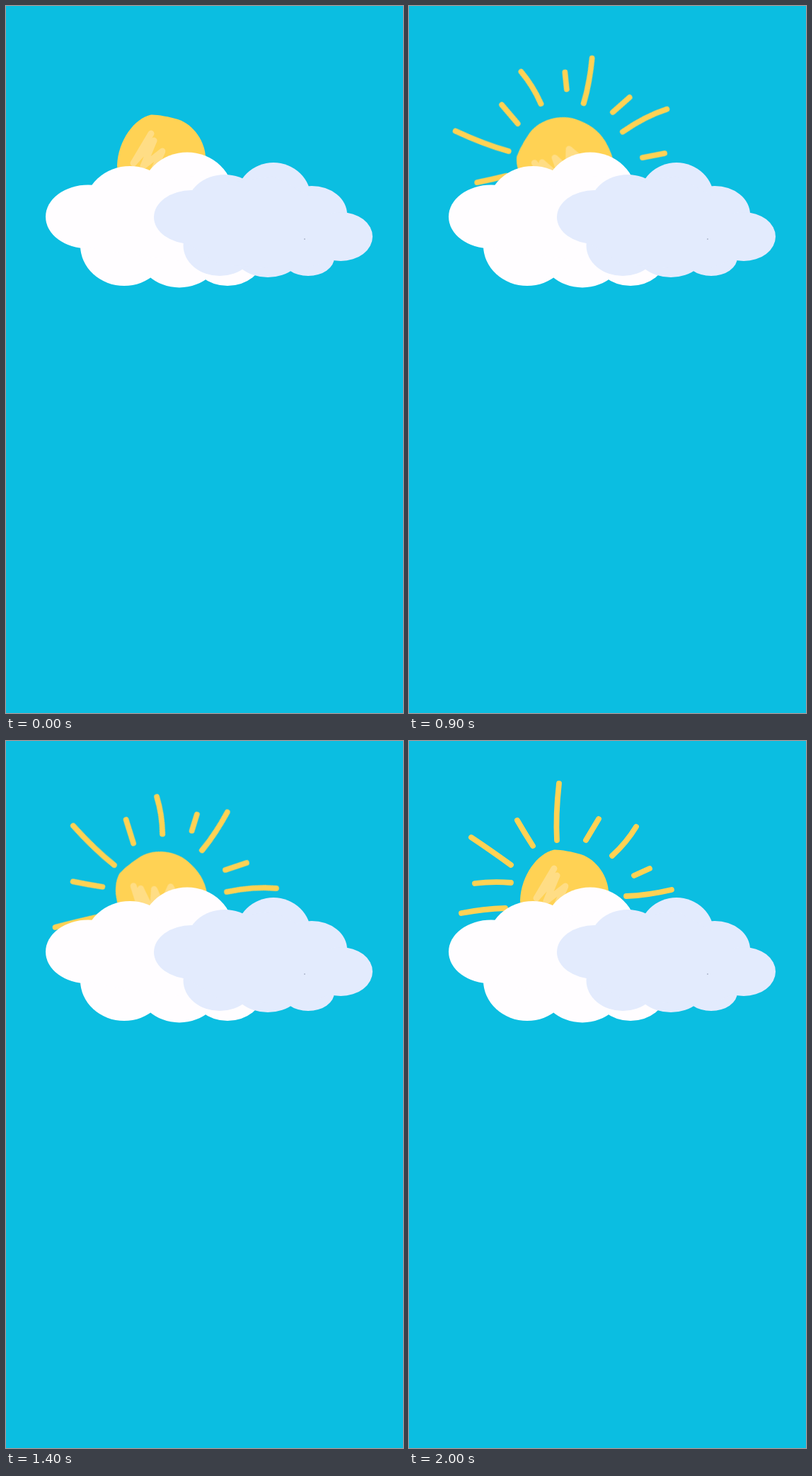
Recreate the animation shown at these times as an HTML page. Size 561 by 998 pixels, loop 2100 ms.

```html
<!DOCTYPE html>
<html lang="en">
<head>
<meta charset="utf-8">
<title>Sun behind clouds</title>
<style>
  html, body { margin: 0; width: 100%; height: 100%; overflow: hidden; background: #0bbee1; }
  svg { display: block; width: 100vw; height: 100vh; }

  .sun, .rays { animation: 2100ms -2ms infinite; }
  .sun { animation-name: swing; }
  .rays {
    animation-name: grow;
    fill: none; stroke: #ffd254; stroke-width: 7.8; stroke-linecap: round;
    stroke-dasharray: 1 2;
  }
  .shine { fill: none; stroke: #ffdd85; stroke-width: 9; stroke-linecap: round; stroke-linejoin: round; }
  .white { fill: #fffdff; }
  .pale { fill: #e3ebfd; }

  /* The picture changes ten times a second, so each stretch is stepped. */
  @keyframes swing {
    0%        { transform: rotate(0deg);     animation-timing-function: steps(4); }
    19.0476%  { transform: rotate(0deg);     animation-timing-function: steps(2); }
    28.5714%  { transform: rotate(-48.4deg); animation-timing-function: steps(3); }
    42.8571%  { transform: rotate(-71.4deg); animation-timing-function: steps(1); }
    47.6190%  { transform: rotate(-85.6deg); animation-timing-function: steps(2); }
    57.1429%  { transform: rotate(0deg);     animation-timing-function: steps(2); }
    66.6667%  { transform: rotate(-48.4deg); animation-timing-function: steps(3); }
    80.9524%  { transform: rotate(-71.4deg); animation-timing-function: steps(1); }
    85.7143%  { transform: rotate(-85.6deg); animation-timing-function: steps(2); }
    95.2381%, 100% { transform: rotate(0deg); }
  }
  @keyframes grow {
    0%       { stroke-dashoffset: 1.2; animation-timing-function: steps(3); }
    14.2857%, 100% { stroke-dashoffset: 0; }
  }
</style>
</head>
<body>
<svg viewBox="0 0 561 998" preserveAspectRatio="none">
  <g transform="translate(220 220)">
    <g class="sun">
      <g class="rays">
        <path pathLength="1" d="M-84 16Q-115 17-146 23"/>
        <path pathLength="1" d="M-76-20Q-102-22-127-19"/>
        <path pathLength="1" d="M-76-45Q-105-66-132-84"/>
        <path pathLength="1" d="M-45-72Q-56-89-67-108"/>
        <path pathLength="1" d="M-11-80Q-13-115-8-160"/>
        <path pathLength="1" d="M30-80L48-110"/>
        <path pathLength="1" d="M67-58Q87-76 101-99"/>
        <path pathLength="1" d="M98-30L120-40"/>
        <path pathLength="1" d="M87-1Q117-2 151-10"/>
        <path pathLength="1" d="M90-38L120-48" transform="rotate(48.4)"/>
        <path pathLength="1" d="M92-7Q130-15 162-12" transform="rotate(48.4)"/>
        <path pathLength="1" d="M110-6L141-12" transform="rotate(71.4)"/>
        <path pathLength="1" d="M86 3L164 5" transform="rotate(85.6)"/>
      </g>
      <path fill="#ffd254" d="M-63 5C-62-30-38-62-15-66.5C-8-67 10-64 23-60C45-53 62-28 62-5C62 15 58 30 46 45C36 56 25 66 13 68C-25 70-62 45-63 5Z"/>
      <path class="shine" d="M-15-40L-40 2L-11-30L-26 6L1-15L-10 9L19 0L12 18"/>
    </g>
  </g>

  <g class="white">
    <ellipse cx="116" cy="297.5" rx="60" ry="45"/>
    <ellipse cx="175" cy="285" rx="64" ry="59"/>
    <ellipse cx="256" cy="269.5" rx="66" ry="63"/>
    <ellipse cx="167" cy="338" rx="62" ry="57"/>
    <ellipse cx="245" cy="340" rx="62" ry="57.5"/>
    <ellipse cx="313" cy="355" rx="50" ry="40"/>
    <path d="M116 297L175 260L256 240L309 242L340 360L245 360L167 350L110 340Z"/>
  </g>

  <g class="pale">
    <ellipse cx="262" cy="298" rx="53" ry="38"/>
    <ellipse cx="309" cy="285" rx="54" ry="47"/>
    <ellipse cx="378" cy="272" rx="53" ry="51"/>
    <ellipse cx="432" cy="294" rx="50" ry="40"/>
    <ellipse cx="473" cy="325.5" rx="45" ry="34.5"/>
    <ellipse cx="427" cy="355" rx="37" ry="26"/>
    <ellipse cx="370" cy="340" rx="53" ry="43"/>
    <ellipse cx="302" cy="338" rx="51.5" ry="43"/>
    <path d="M262 298L309 250L378 240L432 270L473 310L473 345L455 359L427 370L370 370L302 365L255 335Z"/>
  </g>
  <circle cx="422" cy="329" r=".8" fill="#8a93a8"/>
</svg>
</body>
</html>
```
